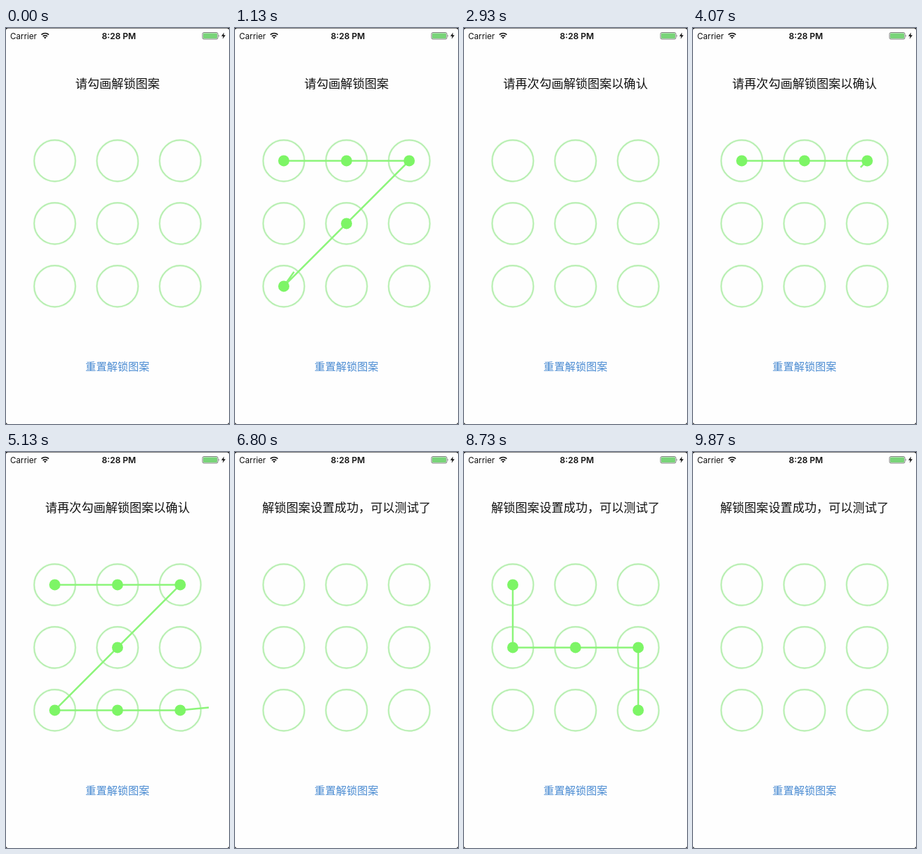
An HTML page for the animation above (9940 ms loop, 320 by 568 pixels).

```html
<!DOCTYPE html>
<html lang="zh-CN">
<head>
<meta charset="utf-8">
<style>
  html, body { margin: 0; width: 100%; height: 100%; overflow: hidden; background: #000; }
  svg { display: block; width: 320px; height: 568px; }
  .cjk { font-family: "Noto Sans CJK SC", "Noto Sans CJK", sans-serif; text-anchor: middle; }
  .status { font-family: Inter, Roboto, sans-serif; fill: #111; }
</style>
</head>
<body>
<svg viewBox="0 0 320 568">
  <rect y=".4" width="320" height="567.6" rx="3" fill="#fefefe"/>

  <text class="status" x="6" y="15.6" font-size="11.7">Carrier</text>
  <g fill="none" stroke="#111" stroke-width="1.7">
    <path d="M50.8 9.6A7.8 7.8 0 0 1 61.4 9.6"/>
    <path d="M53 12A4.6 4.6 0 0 1 59.2 12"/>
  </g>
  <path d="M54.3 13.6A2.7 2.7 0 0 1 57.9 13.6L56.1 15.6Z" fill="#111"/>
  <text class="status" x="162" y="15.6" font-size="12.1" font-weight="600" text-anchor="middle">8:28 PM</text>
  <rect x="282" y="6.5" width="22" height="9.5" rx="2" fill="none" stroke="#566056" stroke-width=".8"/>
  <rect x="283" y="7.5" width="20" height="7.5" rx="1" fill="#79d479"/>
  <path d="M305 9.6Q306.6 11.2 305 12.9Z" fill="#566056"/>
  <path d="M313 6.5L309 11.8H311.7L310.8 15.8L315 10.3H312.3Z" fill="#111"/>

  <text id="message" class="cjk" x="160" y="86.3" font-size="17.3" fill="#111"></text>
  <g transform="translate(0 .4)">
    <g id="rings" fill="none"></g>
    <polyline id="trail" fill="none" stroke="#8cf57a" stroke-width="2.5" stroke-linejoin="round"/>
    <g id="dots" fill="#7df566"></g>
  </g>
  <text class="cjk" x="160" y="490.9" font-size="15.3" fill="#4a8bd2">重置解锁图案</text>
</svg>
<script>
const LOOP = 9940, FRAME = 1000 / 15, RADIUS = 30;
const byId = id => document.getElementById(id);
const message = byId('message'), trail = byId('trail');

const nodes = [190, 280, 370].flatMap(y => [70, 160, 250].map(x => ({ x, y })));

function addCircle(parent, { x, y }, attributes) {
  const circle = document.createElementNS('http://www.w3.org/2000/svg', 'circle');
  for (const [name, value] of Object.entries({ cx: x, cy: y, ...attributes })) circle.setAttribute(name, value);
  return parent.appendChild(circle);
}
// Each ring is a thin line over a faint halo.
for (const node of nodes) {
  addCircle(byId('rings'), node, { r: 29.6, stroke: '#e9fbe6', 'stroke-width': 3.4 });
  addCircle(byId('rings'), node, { r: 29.6, stroke: '#afeca9', 'stroke-width': 1.5 });
}
const dots = nodes.map(node => addCircle(byId('dots'), node, { r: 8 }));

const messages = [
  [0, '请勾画解锁图案'],
  [1600, '请再次勾画解锁图案以确认'],
  [5200, '解锁图案设置成功，可以测试了'],
];

// Finger path as [time, x, y]; the pattern lingers after the finger lifts.
const gestures = [
  { lift: 1600, clear: 2667, path: [[430, 66, 190], [760, 250, 190], [1133, 85, 349], [1200, 70, 369], [1560, 270, 370]] },
  { lift: 5200, clear: 6267, path: [[3600, 66, 190], [4040, 250, 190], [4560, 70, 370], [5030, 262, 369], [5133, 291, 366]] },
  { lift: 8200, clear: 9267, path: [[7270, 70, 190], [7480, 70, 280], [7800, 225, 291], [7880, 250, 284], [8060, 250, 370]] },
];

function fingerAt(path, time) {
  const next = path.findIndex(point => point[0] > time);
  if (next < 0) return { x: path.at(-1)[1], y: path.at(-1)[2] };
  const [t0, x0, y0] = path[Math.max(0, next - 1)];
  const [t1, x1, y1] = path[next];
  const k = t1 > t0 ? (time - t0) / (t1 - t0) : 0;
  return { x: x0 + (x1 - x0) * k, y: y0 + (y1 - y0) * k };
}

// A node joins the pattern once the finger enters its ring.
for (const gesture of gestures) {
  gesture.hits = [];
  for (let time = gesture.path[0][0]; time < gesture.lift; time++) {
    const finger = fingerAt(gesture.path, time);
    const node = nodes.find(n => Math.hypot(n.x - finger.x, n.y - finger.y) < RADIUS);
    if (node && !gesture.hits.some(hit => hit.node === node)) gesture.hits.push({ time, node });
  }
}

function draw(now) {
  const time = Math.floor((now % LOOP + 5) / FRAME) * FRAME + 1;
  message.textContent = messages.findLast(([start]) => start <= time)[1];

  const gesture = gestures.find(g => time >= g.path[0][0] && time < g.clear);
  const selected = gesture ? gesture.hits.filter(hit => hit.time <= time).map(hit => hit.node) : [];
  dots.forEach((dot, i) => dot.setAttribute('visibility', selected.includes(nodes[i]) ? 'visible' : 'hidden'));

  const points = [...selected];
  if (points.length && time < gesture.lift) points.push(fingerAt(gesture.path, time));
  trail.setAttribute('points', points.map(p => `${p.x},${p.y}`).join(' '));
}

const start = performance.now();
function tick() {
  draw(performance.now() - start);
  requestAnimationFrame(tick);
}
tick();
</script>
</body>
</html>
```
